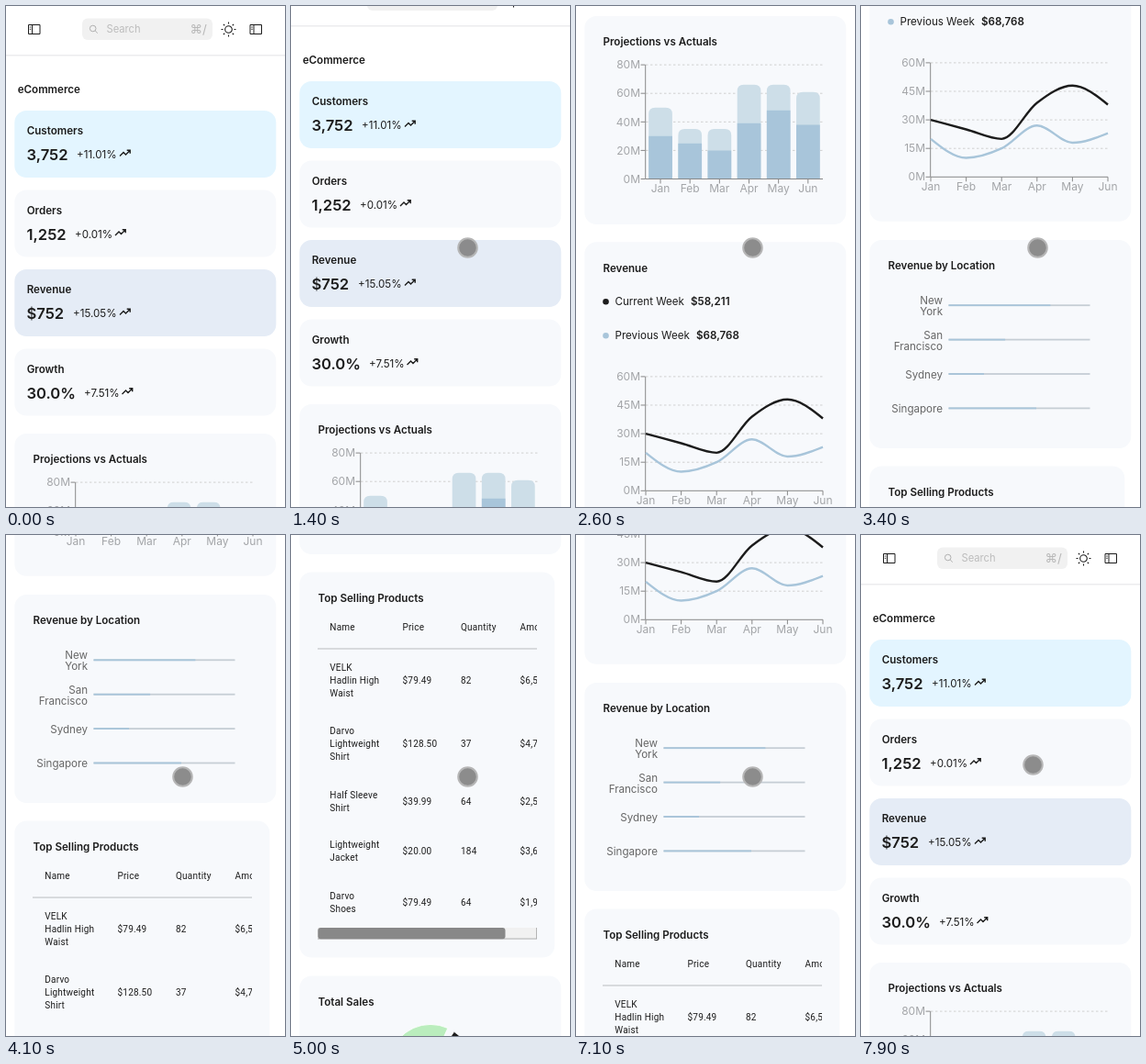
Animation, 304 px wide and 546 px high, one loop 8 s. Source, as an HTML page:

```html
<!DOCTYPE html>
<html lang="en">
<head>
<meta charset="utf-8">
<title>Dashboard scroll</title>
<style>
  html, body { margin: 0; width: 100%; height: 100%; overflow: hidden; background: #fff; }
  svg { display: block; width: 304px; height: 546px; }
  text { font: 400 11.6px Inter, sans-serif; fill: #1c1c1c; white-space: pre; }
  .bold { font-weight: 600; }
  .number { font-size: 16.6px; font-weight: 600; }
  .axis { font-size: 12px; fill: #a3a5a8; }
  .place { fill: #666; }
  .hint { font-size: 11.2px; fill: #bcbcbc; }
  .key { font-size: 13.5px; fill: #b8b8b8; }
  .cell { font: 400 10px Roboto, sans-serif; letter-spacing: .2px; }
  .small { font-size: 10.1px; }
  .end { text-anchor: end; }
  .mid { text-anchor: middle; }
</style>
</head>
<body>
<svg viewBox="0 0 304 546">
  <defs><clipPath id="table"><rect x="29" y="40" width="239" height="400"/></clipPath></defs>
  <g id="page"></g>
  <circle id="cursor" r="10.3" fill="#888" stroke="#b4b4b4" stroke-width="2"/>
</svg>
<script>
const INK = '#1c1c1c', PANEL = '#f7f9fc', BLUE = '#a8c5da', PALE = '#cddee8';
const MONTHS = ['Jan', 'Feb', 'Mar', 'Apr', 'May', 'Jun'];

// Monotone cubic tangents for [x, y] points
function tangents(points) {
  const n = points.length - 1, width = [], slope = [], m = [];
  for (let i = 0; i < n; i++) {
    width[i] = points[i + 1][0] - points[i][0];
    slope[i] = (points[i + 1][1] - points[i][1]) / width[i];
  }
  for (let i = 1; i < n; i++) {
    const a = slope[i - 1], b = slope[i];
    const mean = (a * width[i] + b * width[i - 1]) / (width[i - 1] + width[i]);
    m[i] = (Math.sign(a) + Math.sign(b)) * Math.min(Math.abs(a), Math.abs(b), Math.abs(mean) / 2);
  }
  m[0] = (3 * slope[0] - m[1]) / 2;
  m[n] = (3 * slope[n - 1] - m[n - 1]) / 2;
  return m;
}

function track(points) {
  const m = tangents(points);
  return t => {
    let i = 0;
    while (i < points.length - 2 && t >= points[i + 1][0]) i++;
    const [x0, y0] = points[i], [x1, y1] = points[i + 1], h = x1 - x0, u = (t - x0) / h, v = 1 - u;
    return v * v * ((1 + 2 * u) * y0 + u * h * m[i]) + u * u * ((3 - 2 * u) * y1 - v * h * m[i + 1]);
  };
}

function curvePath(points) {
  const m = tangents(points);
  return points.map(([x, y], i) => {
    if (!i) return `M${x} ${y}`;
    const [px, py] = points[i - 1], d = (x - px) / 3;
    return `C${px + d} ${py + d * m[i - 1]} ${x - d} ${y - d * m[i]} ${x} ${y}`;
  }).join('');
}

const text = (x, y, value, cls = '') => `<text x="${x}" y="${y}" class="${cls}">${value}</text>`;
const rect = (x, y, w, h, fill, r = 0) =>
  `<rect x="${x}" y="${y}" width="${w}" height="${h}" rx="${r}" fill="${fill}"/>`;
const line = (d, color = INK, width = 1, extra = '') =>
  `<path d="${d}" fill="none" stroke="${color}" stroke-width="${width}" ${extra}/>`;
const dot = (x, y, r, fill) => `<circle cx="${x}" cy="${y}" r="${r}" fill="${fill}"/>`;
const section = (top, height, title, body, width = 285) =>
  `<g transform="translate(0 ${top})">${rect(9.3, 0, width, height, PANEL, 13)}${text(29.5, 32.3, title, 'bold')}${body}</g>`;

function header() {
  const panelIcon = x => line(`M${x} 20.5h12.5v10h-12.5zM${x + 4} 20.5v10M${x + 1.3} 23h1.4M${x + 1.3} 25.3h1.4`);
  let rays = '';
  for (let i = 0; i < 8; i++) {
    const c = Math.cos(i * Math.PI / 4), s = Math.sin(i * Math.PI / 4);
    rays += `M${242.5 + 6 * c} ${25.5 + 6 * s}L${242.5 + 8 * c} ${25.5 + 8 * s}`;
  }
  return panelIcon(24.5) + rect(83, 13.5, 142, 23.5, '#f1f1f1', 6)
    + line('M98 24.5a3.3 3.3 0 1 0-6.6 0a3.3 3.3 0 1 0 6.6 0M97.2 27l2.6 2.6', '#b0b0b0')
    + text(109.5, 29, 'Search', 'hint') + text(200.5, 29.7, '⌘/', 'key')
    + line(rays + 'M246.3 25.5a3.8 3.8 0 1 0-7.6 0a3.8 3.8 0 1 0 7.6 0', INK, 1.1)
    + panelIcon(266) + rect(0, 53, 304, 1.5, '#ececee');
}

function stats() {
  return [
    ['Customers', '3,752', '+11.01%', 77, 124, '#e3f5ff'],
    ['Orders', '1,252', '+0.01%', 75, 119, PANEL],
    ['Revenue', '$752', '+15.05%', 73, 124, '#e5ecf6'],
    ['Growth', '30.0%', '+7.51%', 85, 126.5, PANEL]
  ].map(([name, value, change, changeX, iconX, fill], i) =>
    `<g transform="translate(0 ${114 + 86.5 * i})">` + rect(9.3, 0, 285, 73, fill, 13)
    + text(22.7, 26, name, 'bold') + text(22.5, 54, value, 'number') + text(changeX, 52.2, change)
    + line(`M${iconX} 49.5l4-4l2.5 2.5l4.5-4.5m-3.3-.3h3.5v3.5`, INK, 1.4) + '</g>').join('');
}

// Axes with four intervals; the baseline is 124.4 below the top
function axes(top, step, monthX) {
  const base = top + 124.4;
  let out = '';
  for (let i = 0; i <= 4; i++) {
    const y = base - i * 31.1;
    if (i) out += line(`M76 ${y}H269`, '#ccc', .9, 'stroke-dasharray="2.5 2.5"');
    out += line(`M70.5 ${y}h5`, '#888') + text(70, y + 4.2, i * step + 'M', 'axis end');
  }
  out += line(`M75.7 ${top}V${base}H269`, '#888');
  MONTHS.forEach((month, i) => {
    out += line(`M${monthX(i)} ${base}v5`, '#888') + text(monthX(i), base + 14.7, month, 'axis mid');
  });
  return out;
}

function barChart() {
  const base = 177.5, band = 193 / 6, unit = 31.1 / 20;
  const bar = (i, value, fill, r) => {
    const h = value * unit;
    return `<path fill="${fill}" d="M${79.2 + i * band} ${base}v${r - h}q0 ${-r} ${r} ${-r}h${25.7 - 2 * r}q${r} 0 ${r} ${r}v${h - r}z"/>`;
  };
  const actual = [30, 25, 20, 39, 48, 38], total = [50, 35, 35, 66, 66, 61];
  return axes(base - 124.4, 20, i => 92 + i * band)
    + total.map((v, i) => bar(i, v, PALE, 7)).join('')
    + actual.map((v, i) => bar(i, v, BLUE, 0)).join('')
    + line(`M75.7 ${base}H269`, '#888');
}

function lineChart() {
  const base = 271, x = i => 76 + 38.6 * i;
  const series = (values, color) =>
    line(curvePath(values.map((v, i) => [x(i), base - v * 31.1 / 15])), color, 2.4);
  const legend = (y, color, name, value, valueX) =>
    dot(32.5, y, 3.3, color) + text(42.5, y + 4.2, name) + text(valueX, y + 4.2, value, 'bold');
  return legend(65, INK, 'Current Week', '$58,211', 125)
    + legend(102, BLUE, 'Previous Week', '$68,768', 131)
    + axes(base - 124.4, 15, x)
    + series([20, 10, 15, 27, 18, 23], BLUE) + series([30, 25, 20, 39, 48, 38], INK);
}

function locations() {
  return [[['New', 'York'], .72], [['San', 'Francisco'], .4], [['Sydney'], .25], [['Singapore'], .62]]
    .map(([words, share], i) => {
      const y = 71.2 + 37.4 * i;
      return rect(95.5, y - .9, 154, 1.8, '#c6ced5') + rect(95.5, y - .9, 154 * share, 1.8, BLUE)
        + words.map((w, k) => text(89, y + 5 + (k - (words.length - 1) / 2) * 12, w, 'place end')).join('');
    }).join('');
}

function products() {
  const columns = [42.3, 121.5, 185, 249.5];
  const row = (y, names, ...rest) =>
    names.map((n, k) => text(columns[0], y + 3.6 + (k - (names.length - 1) / 2) * 14, n, 'cell')).join('')
    + rest.map((v, k) => text(columns[k + 1], y + 3.6, v, 'cell')).join('');
  return '<g clip-path="url(#table)">'
    + row(60.3, ['Name'], 'Price', 'Quantity', 'Amount')
    + rect(29, 82.8, 239, 1.3, '#c9cbce')
    + row(118.3, ['VELK', 'Hadlin High', 'Waist'], '$79.49', '82', '$6,518.18')
    + row(186.8, ['Darvo', 'Lightweight', 'Shirt'], '$128.50', '37', '$4,754.50')
    + row(249.8, ['Half Sleeve', 'Shirt'], '$39.99', '64', '$2,559.36')
    + row(304.3, ['Lightweight', 'Jacket'], '$20.00', '184', '$3,680.00')
    + row(359.8, ['Darvo', 'Shoes'], '$79.49', '64', '$1,965.81')
    + rect(29, 387.5, 239, 12.5, '#a5a5a5') + rect(29, 387.5, 238.2, 11.6, '#f1f1f1')
    + rect(29.3, 387.5, 204.2, 12.3, '#888', 3) + '</g>';
}

function sales() {
  const items = [['Direct', 400, INK], ['Affilliate', 700, '#baedbd'],
    ['Sponsored', 200, '#95a4fc'], ['E-mail', 1000, '#b1e3ff']];
  const at = (r, deg) => {
    const a = deg * Math.PI / 180;
    return `${152 + r * Math.cos(a)} ${98.5 - r * Math.sin(a)}`;
  };
  let angle = 0;
  return items.map(([name, value, color], i) => {
    const from = angle, to = from + value / 2300 * 320, y = 169.2 + 26.6 * i;
    angle = to + 10;
    return `<path fill="${color}" stroke="#fff" stroke-width=".8" d="M${at(45.6, from)}A45.6 45.6 0 0 0 ${at(45.6, to)}L${at(25, to)}A25 25 0 0 1 ${at(25, from)}z"/>`
      + dot(32.5, y, 3.3, color) + text(42.5, y + 3.7, name, 'small') + text(274, y + 3.7, '$' + value, 'small end');
  }).join('');
}

const page = document.getElementById('page'), cursor = document.getElementById('cursor');
page.innerHTML = header() + text(12.7, 95.2, 'eCommerce', 'bold') + stats()
  + section(466, 227, 'Projections vs Actuals', barChart())
  + section(712.3, 319.4, 'Revenue', lineChart())
  + section(1052, 227, 'Revenue by Location', locations())
  + section(1298.5, 420, 'Top Selling Products', products(), 278)
  + section(1738.5, 287, 'Total Sales', sales());

const scroll = track([[0, 0], [800, 0], [1400, 32], [2600, 455], [3400, 797], [4200, 1010], [4700, 1115],
  [5000, 1258], [5300, 1440], [5700, 1476], [6200, 1492], [6400, 1510], [6600, 1516], [6700, 1516],
  [7150, 800], [7600, 2], [7900, 0], [8000, 0]]);
const drift = track([[0, 1], [100, 1], [700, 0], [7600, 0], [7900, 1], [8000, 1]]);

function draw() {
  const t = Math.floor(performance.now() % 8000 / 100) * 100;
  const k = drift(t);
  page.setAttribute('transform', `translate(0 ${-scroll(t)})`);
  cursor.setAttribute('transform', `translate(${192.5 - 5 * k} ${263.5 - 13 * k})`);
  cursor.setAttribute('opacity', Math.min(1, t / 300) * .96);
  requestAnimationFrame(draw);
}
draw();
</script>
</body>
</html>
```
